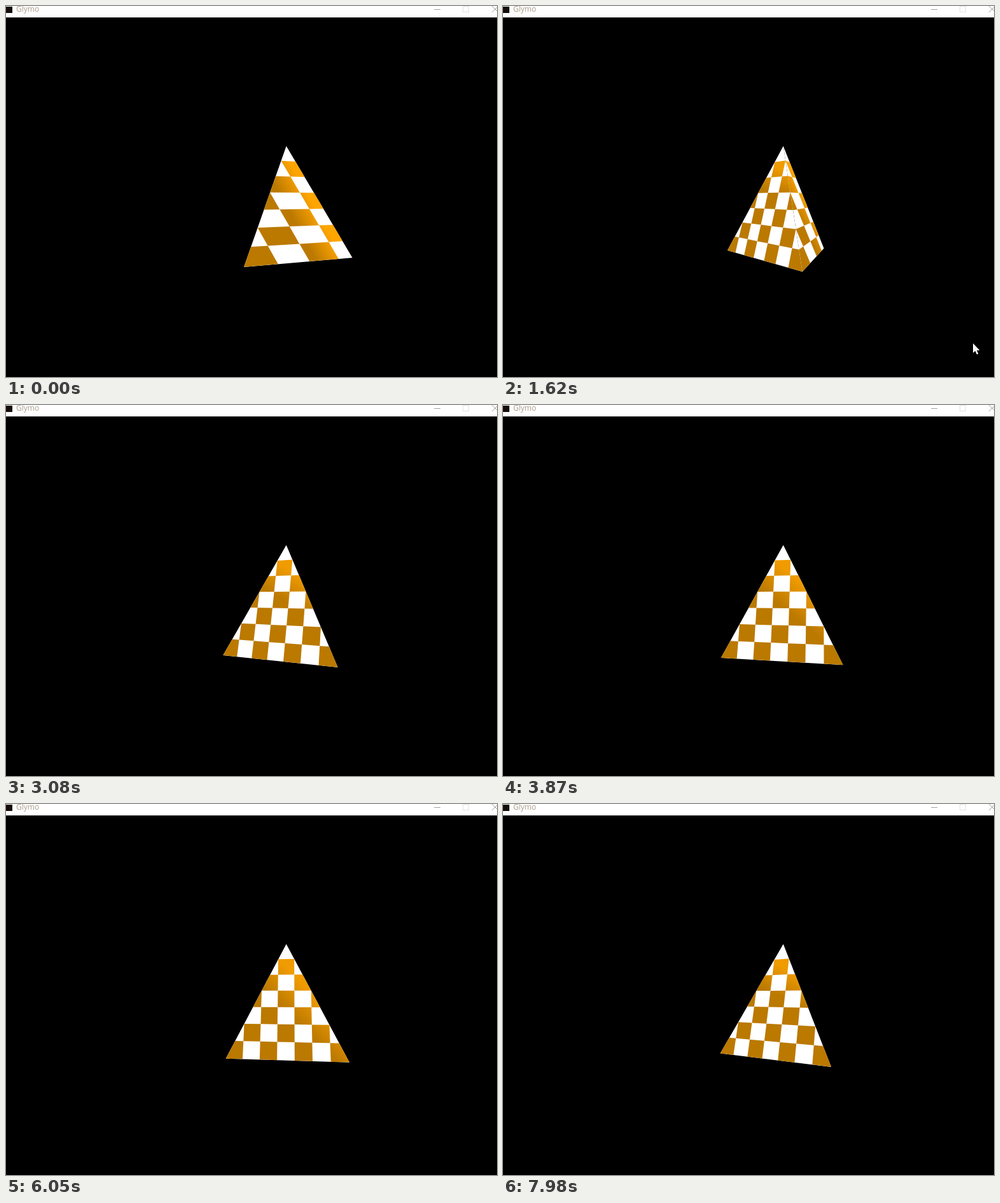
Animation of 772 by 584 pixels, one loop 8 s. Source, as an HTML page with a canvas:

```html
<!DOCTYPE html>
<html lang="en">
<head>
<meta charset="utf-8">
<title>Rotating pyramid</title>
<style>
  html, body { margin: 0; width: 100%; height: 100%; overflow: hidden; background: #000; }
  canvas { display: block; }
</style>
</head>
<body>
<canvas id="stage" width="772" height="584"></canvas>
<script>
const ctx = document.getElementById('stage').getContext('2d');
const LOOP = 8000, STEP = 77.5, CELLS = 7;
const EYE = { x: 386, y: 301, depth: 443 };
const AXIS = 54.7, RADIUS = 99, BASE = 91.3;
const APEX = [AXIS, -80.5, 0];

// Cursor tip: time, x, y
const CURSOR = [[540, 725, 584], [840, 731, 506], [1000, 731, 506],
                [1600, 739, 529], [1780, 739, 540], [1940, 736, 586]];

const rad = deg => deg * Math.PI / 180;
const mix = (a, b, k) => a + (b - a) * k;
const orange = level => `rgb(${Math.round(255 * level)},${Math.round(165 * level)},0)`;

function project([x, y, z]) {
  const q = 1 - z / EYE.depth;
  return [EYE.x + x / q, EYE.y + y / q];
}

function corner(deg) {
  const a = rad(deg);
  return [AXIS + RADIUS * Math.cos(a), BASE, RADIUS * Math.sin(a)];
}

function tracePoly(points) {
  ctx.beginPath();
  points.forEach(([x, y], i) => i ? ctx.lineTo(x, y) : ctx.moveTo(x, y));
  ctx.closePath();
}

// The light ramp crosses the pyramid axis between the bright and dark heights.
function ramp({ tilt, bright, dark, peak }) {
  const a = rad(tilt), w = (dark - bright) * Math.cos(a);
  const g = ctx.createLinearGradient(441, dark, 441 + Math.sin(a) * w, dark - Math.cos(a) * w);
  g.addColorStop(0, orange(0.733));
  g.addColorStop(1, orange(peak));
  return g;
}

function drawFace(left, right, span, light) {
  const tri = [left, right, APEX].map(project);
  const [l, r, a] = tri;
  if ((r[0] - l[0]) * (a[1] - l[1]) - (r[1] - l[1]) * (a[0] - l[0]) >= 0) return;

  const at = (u, v) => project(left.map((p, i) => {
    const across = (right[i] - p) / span;
    return p + u * across + v * (APEX[i] - p - across / 2);
  }));

  ctx.save();
  tracePoly(tri);
  ctx.fillStyle = '#fff';
  ctx.fill();
  ctx.clip();
  ctx.fillStyle = ramp(light);
  for (let row = 0; row < CELLS; row++) {
    for (let col = row % 2; col < CELLS * span; col += 2) {
      const u = col / CELLS, v = row / CELLS, d = 1 / CELLS;
      tracePoly([at(u, v), at(u + d, v), at(u + d, v + d), at(u, v + d)]);
      ctx.fill();
    }
  }
  ctx.restore();
}

function drawPyramid(seconds) {
  const s = seconds - 5.42;
  const turn = -83.5 + (3.4 + 0.035 * s) * s * s;
  const [c0, c1, c2] = [0, 120, 240].map(d => corner(turn + d));
  const past = Math.max(0, -51 - turn);
  drawFace(c2, c1, 1, { tilt: 17 + past * 0.9, bright: 257, dark: 297 + past * 0.95, peak: 0.94 });
  drawFace(c1, c0, 0.5, { tilt: 61.5, bright: 235, dark: 310 + turn * 0.55, peak: 1 });
}

function drawCursor(ms) {
  const i = CURSOR.findIndex(p => p[0] > ms);
  if (i < 1) return;
  const [from, to] = [CURSOR[i - 1], CURSOR[i]];
  const k = (ms - from[0]) / (to[0] - from[0]);
  ctx.save();
  ctx.translate(Math.round(mix(from[1], to[1], k)), Math.round(mix(from[2], to[2], k)));
  tracePoly([[0, 0], [0, 15], [3.5, 12], [6, 17.5], [8.3, 16.5], [6, 11], [10.5, 11]]);
  ctx.fillStyle = '#fff';
  ctx.fill();
  ctx.restore();
}

function drawTitleBar() {
  ctx.fillStyle = '#fff';
  ctx.fillRect(0, 0, 772, 18);
  ctx.fillStyle = '#140c08';
  ctx.fillRect(0, 1, 10, 10);
  ctx.fillStyle = '#aa9c8c';
  ctx.font = '12px "Open Sans", "Noto Sans", sans-serif';
  ctx.fillText('Glymo', 16, 9);
  ctx.lineWidth = 1;
  ctx.strokeStyle = '#a8a098';
  ctx.beginPath();
  ctx.moveTo(673, 5.5);
  ctx.lineTo(683, 5.5);
  ctx.moveTo(764, 0);
  ctx.lineTo(774, 10);
  ctx.moveTo(764, 10);
  ctx.lineTo(774, 0);
  ctx.stroke();
  ctx.strokeStyle = '#e6e2de';
  ctx.strokeRect(718.5, 0.5, 9, 9);
}

function render(now) {
  const ms = Math.floor((now % LOOP + 13) / STEP) * STEP;
  ctx.fillStyle = '#000';
  ctx.fillRect(0, 0, 772, 584);
  drawPyramid(ms / 1000);
  drawCursor(ms);
  drawTitleBar();
}

const start = performance.now();
function tick() {
  render(performance.now() - start);
  requestAnimationFrame(tick);
}
tick();
</script>
</body>
</html>
```
